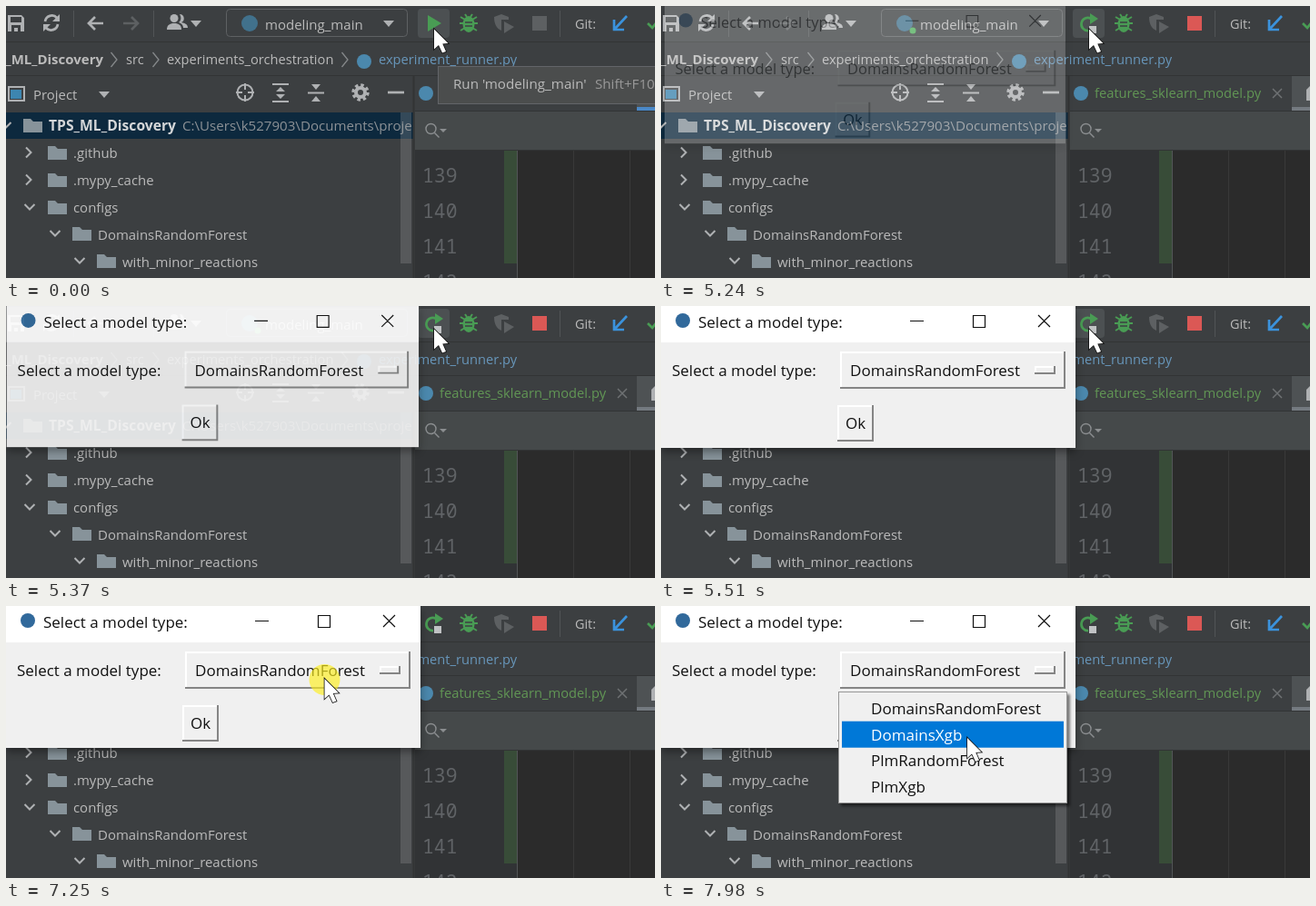
Write an HTML page that moves like this. It is 714 by 299 pixels and loops after 8 s.

```html
<!DOCTYPE html>
<html lang="en">
<head>
<meta charset="utf-8">
<title>Choosing a model type</title>
<style>
  html, body { margin: 0; width: 100%; height: 100%; overflow: hidden; background: #3c3f41; }
  svg { display: block; width: 714px; height: 299px; }
  text { font: 14.95px "Open Sans", "Noto Sans", sans-serif; fill: #bbb; white-space: pre; }
  .crumb text { font-size: 14.65px; }
  .crumb .bold { font-size: 15px; }
  .bold { font-weight: 700; }
  .num text { font: 21.4px "Noto Sans Mono", "DejaVu Sans Mono", monospace; fill: #606366; }
  .line { fill: none; stroke: #afb1b3; stroke-width: 2; }
  .thick { stroke-width: 2.7; }
  .fill { fill: #afb1b3; }
  .dim { fill: #5d6062; }
  .green { fill: #499c54; }
  #dialog text, #menu text { font-size: 17px; fill: #111; }
  #dialog { filter: drop-shadow(0 4px 5px rgba(0,0,0,.4)); }
  #menu { filter: drop-shadow(3px 3px 1.5px rgba(0,0,0,.5)); }
  #menu text.on { fill: #fff; }
</style>
</head>
<body>
<svg viewBox="0 0 714 299">
  <defs>
    <path id="folder" d="M0 0h8l3 3h10v12H0z" fill="#87939a"/>
    <path id="right" class="line" d="M-3-5.5 2.5 0-3 5.5"/>
    <path id="down" class="line" d="M-5.5-3 0 2.5 5.5-3"/>
    <path id="crumb" class="line" d="M-3.5-8 3 0-3.5 8" style="stroke:#85888a;stroke-width:1.3"/>
    <path id="drop" class="fill" d="M-6-3H6L0 4z"/>
  </defs>

  <!-- toolbar -->
  <rect width="714" height="299" fill="#3c3f41"/>
  <path class="fill" fill-rule="evenodd" d="M2 10h15l3 3v15H2zM5 12v6h12v-6zM6 21v7h3v-4h4v4h3v-7z"/>
  <path class="line thick" d="M43 17a7.5 7.5 0 0 1 13-4M57 20a7.5 7.5 0 0 1-13 4"/>
  <path class="fill" d="M59 9v8h-8zM41 28v-8h8z"/>
  <path class="line thick" d="M107 19H91M98 12l-7 7 7 7"/>
  <path class="line thick" style="stroke:#5d6062" d="M129 19h16M138 12l7 7-7 7"/>
  <path d="M74.5 5v29M162.5 5v29M609.5 5v29" stroke="#515456"/>
  <path class="fill" d="M177 26c0-5 3-7 8-7s8 2 8 7z"/>
  <circle class="fill" cx="185" cy="13.5" r="4.5"/>
  <path class="fill" d="M191 9c6 0 6 8 2 9 4 1 7 2 7 6h-5c0-3-2-5-5-6 3-2 3-6 1-9z"/>
  <use href="#drop" x="209" y="19"/>
  <rect x="242.5" y="3.5" width="199" height="30" rx="4" fill="#3c3f41" stroke="#5e6163"/>
  <circle cx="268" cy="19" r="9" fill="#41718c"/>
  <text x="285" y="26" style="font-size:15px">modeling_main</text>
  <use href="#drop" x="421" y="19"/>

  <rect id="hover" x="453" y="3" width="35" height="32" rx="4" fill="#4c5052"/>
  <path id="play" class="green" d="M464 10l15 9-15 9z"/>
  <g id="rerun">
    <path class="line thick" style="stroke:#499c54" d="M470 27a7 7 0 1 1 3-13"/>
    <path class="green" d="M472 8l9 6-9 6z"/>
    <rect x="471" y="22" width="8" height="8" fill="#c0c2c4"/>
    <circle cx="277" cy="27" r="3.5" fill="#4fae5b"/>
  </g>
  <path class="line" style="stroke:#499c54" d="M499 19h20M500 12l5 3M518 12l-5 3M500 27l5-3M518 27l-5-3M505 9l2 3M513 9l-2 3"/>
  <ellipse class="green" cx="509" cy="20" rx="6.5" ry="9"/>
  <path d="M505 18h8M505 22h8" stroke="#3c3f41" stroke-width="1.6"/>
  <path class="dim" d="M537 12l8-3 8 3v3h-8v12c-5-2-8-7-8-15z"/>
  <path class="dim" d="M548 17l11 6-11 7z"/>
  <rect id="stop" x="579" y="11" width="16" height="16"/>
  <text x="626" y="25" style="font-size:14.4px">Git:</text>
  <path class="line thick" style="stroke:#3b92dc" d="M683 11l-13 14M669 15v11h11"/>
  <path class="line thick" style="stroke:#499c54" d="M706 19l5 5 8-10"/>

  <!-- breadcrumbs -->
  <path d="M0 39.5h714M0 76.5h714" stroke="#323435"/>
  <g class="crumb">
    <text class="bold" x="107" y="64" text-anchor="end">_ML_Discovery</text>
    <text x="132" y="64">src</text>
    <text x="177" y="64">experiments_orchestration</text>
    <text x="410" y="64" style="fill:#6897bb">experiment_runner.py</text>
  </g>
  <use href="#crumb" x="119" y="59"/>
  <use href="#crumb" x="165" y="59"/>
  <use href="#crumb" x="373" y="59"/>
  <circle cx="394" cy="61" r="8" fill="#4b88ad"/>

  <!-- project panel -->
  <path class="line" d="M3 89h17v15H3z"/>
  <rect x="5" y="92" width="12" height="10" fill="#3d86b0"/>
  <text x="30" y="103">Project</text>
  <use href="#drop" x="108" y="97"/>
  <circle class="line" cx="263" cy="95" r="8.5"/>
  <path class="line" d="M263 85v7M263 98v7M253 95h7M266 95h7"/>
  <path class="line" d="M293 86h18M293 105h18M332 95.5h18"/>
  <path class="fill" d="M297 94l5-5 5 5zM297 97h10l-5 5zM336 86h10l-5 6zM336 105h10l-5-6z"/>
  <circle class="line" cx="390" cy="95" r="5" style="stroke-width:4"/>
  <circle class="line" cx="390" cy="95" r="8" style="stroke-width:3.4;stroke-dasharray:3.4 2.883"/>
  <path class="line thick" d="M420 95h18"/>
  <rect y="117" width="448" height="29" fill="#0d293e"/>
  <use href="#down" x="0" y="131"/>
  <use href="#folder" x="19" y="124"/>
  <text class="bold" x="47" y="137" style="font-size:15.7px;fill:#d4d6d8">TPS_ML_Discovery</text>
  <text x="194" y="137" style="font-size:15.1px;fill:#8c9196">C:\Users\k527903\Documents\proje</text>
  <use href="#right" x="25" y="161"/>
  <use href="#folder" x="46" y="154"/>
  <text x="74" y="167">.github</text>
  <use href="#right" x="25" y="191"/>
  <use href="#folder" x="46" y="184"/>
  <text x="74" y="197">.mypy_cache</text>
  <use href="#down" x="26" y="221"/>
  <use href="#folder" x="46" y="214"/>
  <text x="74" y="227">configs</text>
  <use href="#down" x="54" y="250"/>
  <use href="#folder" x="73" y="243"/>
  <text x="101" y="257">DomainsRandomForest</text>
  <use href="#down" x="81" y="280"/>
  <use href="#folder" x="100" y="273"/>
  <text x="128" y="287">with_minor_reactions</text>
  <rect x="434" y="117" width="12" height="166" fill="#a6a6a6" opacity=".25"/>
  <path d="M448.5 77v222" stroke="#323435" stroke-width="2"/>

  <!-- editor -->
  <circle cx="462" cy="96" r="8" fill="#4b88ad"/>
  <text x="477" y="101" style="font-size:14.7px;fill:#629755">features_sklearn_model.py</text>
  <path class="line" style="stroke:#6e7173;stroke-width:1.5" d="M673 91l10 10M683 91l-10 10"/>
  <rect x="694" y="77" width="20" height="38" fill="#4e5254"/>
  <path class="fill" d="M714 88v16h-4V92z"/>
  <rect id="tabline" x="694" y="111" width="20" height="4"/>
  <rect x="450" y="115" width="264" height="43" fill="#45494a"/>
  <path d="M450 115.5h264M450 158.5h264" stroke="#323435"/>
  <circle class="line" cx="467.5" cy="135" r="5.5" style="stroke:#8b8e90;stroke-width:1.4"/>
  <path class="line" style="stroke:#8b8e90;stroke-width:1.4" d="M471.5 139.5l5 5"/>
  <path d="M477 135h8l-4 4z" fill="#8b8e90"/>
  <rect x="450" y="159" width="113" height="140" fill="#313335"/>
  <rect x="563" y="159" width="151" height="140" fill="#2b2b2b"/>
  <rect x="548" y="159" width="14" height="124" fill="#384c38"/>
  <path d="M562.5 159v140" stroke="#525557"/>
  <path d="M624.5 159v140M686.5 159v140" stroke="#393939"/>
  <g class="num">
    <text x="458" y="194">139</text>
    <text x="458" y="233">140</text>
    <text x="458" y="272">141</text>
    <text x="458" y="311">142</text>
  </g>

  <g id="tooltip">
    <rect x="475.5" y="66.5" width="250" height="41" fill="#4b4d4d" stroke="#636569"/>
    <text x="492" y="91" style="font-size:15.15px">Run 'modeling_main'</text>
    <text x="648" y="91" style="font-size:15.15px;fill:#999">Shift+F10</text>
  </g>

  <g id="dialog">
    <rect width="456" height="156" fill="#f0f0f0"/>
    <rect width="456" height="40" fill="#fff"/>
    <circle cx="24" cy="16" r="8" fill="#31699b"/>
    <text x="41" y="24">Select a model type:</text>
    <path d="M274 16.5h15M343.5 10.5h13v13h-13zM415 10l13 13M428 10l-13 13" fill="none" stroke="#111" stroke-width="1.2"/>
    <text x="12" y="77">Select a model type:</text>
    <g id="raised"></g>
    <text x="208" y="77">DomainsRandomForest</text>
    <text x="203" y="135">Ok</text>
  </g>

  <g id="menu">
    <rect x="195.5" y="94.5" width="251" height="122" fill="#f0f0f0" stroke="#979797"/>
    <rect id="bar" x="199" width="244" height="29" fill="#0078d7"/>
  </g>

  <circle id="click" r="17" fill="#fff01e" opacity=".65"/>
  <path id="cursor" d="M0 0V22L5 17.500 9 26 13 24.500 9.300 16 15.500 15.500z" fill="#fff" stroke="#111" stroke-width="1.6" paint-order="stroke"/>
</svg>
<script>
  const el = id => document.getElementById(id);
  const show = (id, on) => el(id).style.display = on ? "" : "none";
  const within = (t, a, b) => t >= a && t < b;

  // Fraction of the n discrete steps, spread from a to b, that are done at t.
  const steps = (t, a, b, n) =>
    t < a ? 0 : Math.min(n, Math.floor((t - a) / (b - a) * (n - 1) + 0.1) + 1) / n;
  const ease = p => p * p * (3 - 2 * p);

  const bevel = (x, y, w, h) => `
    <rect x="${x}" y="${y}" width="${w}" height="${h}" fill="#f0f0f0"/>
    <path d="M${x + 1} ${y + h}V${y + 1}H${x + w}" fill="none" stroke="#fff" stroke-width="2"/>
    <path d="M${x} ${y + h - 1}H${x + w - 1}V${y}" fill="none" stroke="#858585" stroke-width="2"/>`;
  el("raised").innerHTML = bevel(197, 50, 248, 41) + bevel(411, 66, 23, 9) + bevel(194, 109, 40, 40);

  const rowTop = i => 98 + i * 28.7;
  const items = ["DomainsRandomForest", "DomainsXgb", "PlmRandomForest", "PlmXgb"].map((name, i) => {
    const label = document.createElementNS("http://www.w3.org/2000/svg", "text");
    label.textContent = name;
    label.setAttribute("x", 231);
    label.setAttribute("y", rowTop(i) + 21);
    el("menu").append(label);
    return label;
  });

  const fade = [0, 0.23, 0.65, 0.93, 1, 1];

  function draw(t) {
    const running = t >= 860;
    show("tooltip", t < 460);
    show("hover", t < 6100);
    el("hover").setAttribute("fill", within(t, 460, 660) ? "#5c6164" : "#4c5052");
    show("play", !running);
    show("rerun", running);
    el("stop").setAttribute("fill", running ? "#db5855" : "#5d6062");
    el("tabline").setAttribute("fill", t < 5240 ? "#4a88c7" : "#747a80");

    const open = Math.round(steps(t, 5240, 5510, 5) * 5);
    const shrink = 0.033 * Math.pow(1 - Math.max(0, open - 1) / 4, 2.5);
    show("dialog", open);
    el("dialog").style.opacity = fade[open];
    el("dialog").setAttribute("transform", `translate(${120 * shrink} ${10 * shrink}) scale(${1 - shrink})`);

    const toButton = ease(steps(t, 6100, 6700, 10));
    const toItem = ease(steps(t, 7780, 7980, 4));
    const x = 471 - 120.5 * toButton - 13.5 * toItem;
    const y = 25.5 + 54.5 * toButton + 65 * toItem;
    el("cursor").setAttribute("transform", `translate(${x} ${y})`);
    el("click").setAttribute("transform", `translate(${x} ${y + 1})`);
    show("click", within(t, 460, 660) || within(t, 7250, 7450));

    const menu = steps(t, 7250, 7450, 4);
    show("menu", menu > 0.25);
    el("menu").style.opacity = menu > 0.5 ? 1 : 0.5;
    const row = y < rowTop(0) ? -1 : Math.floor((y - rowTop(0)) / 28.7);
    show("bar", row >= 0);
    el("bar").setAttribute("y", rowTop(Math.max(0, row)));
    items.forEach((label, i) => label.classList.toggle("on", i === row));
  }

  function loop() {
    draw(performance.now() % 8000);
    requestAnimationFrame(loop);
  }
  loop();
</script>
</body>
</html>
```
